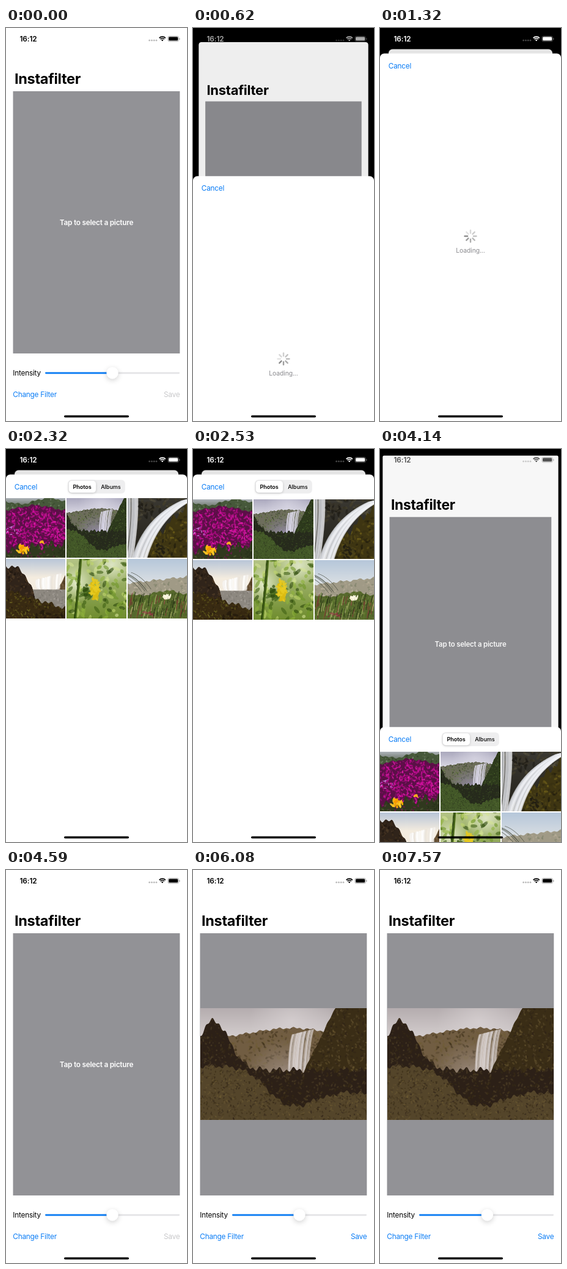
Write an HTML page with a canvas that moves like this. It is 296 px wide and 640 px high and loops after 8000 ms.

```html
<!DOCTYPE html>
<html lang="en">
<head>
<meta charset="utf-8">
<title>Instafilter</title>
<style>
html, body { margin: 0; width: 100%; height: 100%; overflow: hidden; background: #fff; }
canvas { display: block; width: 296px; height: 640px; }
</style>
</head>
<body>
<canvas id="stage"></canvas>
<script>
const W = 296, H = 640, LOOP = 8000;
const PT = 0.6916, BODY = 17 * PT;
const BLUE = '#0a7cf5', GREY = '#929296';
const stage = document.getElementById('stage');
const dpr = window.devicePixelRatio || 1;
stage.width = W * dpr;
stage.height = H * dpr;
const ctx = stage.getContext('2d');

const clamp = v => Math.max(0, Math.min(1, v));
const bump = (x, centre, width) => Math.exp(-(((x - centre) / width) ** 2));
const spring = ms => ms <= 0 ? 0 : 1 - Math.exp(-ms * 0.014) * (1 + ms * 0.014);
// Snaps t to the latest of n evenly spaced moments from a to b.
const snap = (t, a, b, n) => {
  const gap = (b - a) / (n - 1);
  return a + gap * Math.min(n - 1, Math.floor((t - a) / gap + 1e-6));
};

function text(str, x, y, size, colour, { weight = 400, align = 'left', track = -0.2 } = {}) {
  ctx.font = `${weight} ${size}px Inter, "Liberation Sans", sans-serif`;
  ctx.letterSpacing = track + 'px';
  ctx.textAlign = align;
  ctx.fillStyle = colour;
  ctx.fillText(str, x, y);
}

function box(x, y, w, h, r, colour) {
  ctx.fillStyle = colour;
  ctx.beginPath();
  ctx.roundRect(x, y, w, h, r);
  ctx.fill();
}

function raised(x, y, w, h, r, blur, dy) {
  ctx.save();
  ctx.shadowColor = 'rgba(0,0,0,0.18)';
  ctx.shadowBlur = blur * dpr;
  ctx.shadowOffsetY = dy * dpr;
  box(x, y, w, h, r, '#fff');
  ctx.restore();
}

// ---- Pictures ----

function picture(w, h, paint) {
  const c = document.createElement('canvas');
  c.width = w * 2;
  c.height = h * 2;
  const g = c.getContext('2d');
  g.scale(2, 2);
  let seed = 7;
  const rnd = () => (seed = seed * 16807 % 2147483647) / 2147483647;
  const pick = list => list[Math.floor(rnd() * list.length)];

  paint({
    sky(top, bottom, end = h) {
      const f = g.createLinearGradient(0, 0, 0, end);
      f.addColorStop(0, top);
      f.addColorStop(1, bottom);
      g.fillStyle = f;
      g.fillRect(0, 0, w, h);
    },
    // Land below y = line(x), grained with flecks of other colours.
    land(colour, line, flecks = [], size = 2, rough = 2) {
      g.save();
      g.beginPath();
      g.moveTo(0, h);
      for (let x = 0; x <= w; x++) g.lineTo(x, line(x) + rough * Math.sin(x * 0.4) * Math.sin(x * 0.17 + 1));
      g.lineTo(w, h);
      g.fillStyle = colour;
      g.fill();
      g.clip();
      for (let i = 0; flecks.length && i < w * h / size / 12; i++) {
        g.globalAlpha = 0.2 + rnd() * 0.4;
        g.fillStyle = pick(flecks);
        g.beginPath();
        g.ellipse(rnd() * w, rnd() * h, size * (0.5 + rnd()), size * 0.6, rnd() * 3, 0, 7);
        g.fill();
      }
      g.restore();
    },
    patch(colours, n, x, y, rx, ry, size, alpha = 0.8) {
      g.globalAlpha = alpha;
      for (let i = 0; i < n; i++) {
        const a = rnd() * 7, d = Math.sqrt(rnd());
        g.fillStyle = pick(colours);
        g.beginPath();
        g.ellipse(x + rx * d * Math.cos(a), y + ry * d * Math.sin(a), size * (0.5 + rnd()), size * 0.5, rnd() * 3, 0, 7);
        g.fill();
      }
      g.globalAlpha = 1;
    },
    glow(x, y, r, rgb, a) {
      const f = g.createRadialGradient(x, y, 0, x, y, r);
      f.addColorStop(0, `rgba(${rgb},${a})`);
      f.addColorStop(1, `rgba(${rgb},0)`);
      g.fillStyle = f;
      g.fillRect(x - r, y - r, r * 2, r * 2);
    },
    // Bundle of curved strands, each scattered by up to `spread`.
    strands(colours, n, [x0, y0], [cx, cy], [x1, y1], spread, width, alpha = 0.4) {
      g.globalAlpha = alpha;
      g.lineWidth = width;
      for (let i = 0; i < n; i++) {
        const d = (rnd() - 0.5) * 2 * spread;
        g.strokeStyle = pick(colours);
        g.beginPath();
        g.moveTo(x0 + d, y0 - d * 0.25);
        g.quadraticCurveTo(cx + d, cy - d * 0.25, x1 + d * 0.9, y1 + rnd() * 6);
        g.stroke();
      }
      g.globalAlpha = 1;
    }
  });
  return c;
}

const valley = tone => picture(273, 182, p => {
  p.sky(tone.sky, tone.haze, 50);
  p.glow(150, 22, 70, tone.light, 0.6);
  p.land(tone.hill, x => 50 - 18 * bump(x, 150, 90), [tone.moss, tone.dark], 2.5);
  p.glow(140, 122, 74, tone.mist, 0.95);
  p.strands([tone.fall, tone.haze], 60, [169, 38], [162, 56], [160, 130], 18, 2, 0.35);
  p.glow(140, 130, 40, tone.mist, 0.8);
  p.land(tone.dark, x => 158 - 2 * (x - 142), [tone.moss, tone.ground, tone.shade], 2.2);
  p.land(tone.shade, x => 100 - 80 * bump(x, 22, 36), [tone.ground, tone.dark], 2.2, 5);
  p.land(tone.ground, x => 94 + 64 * bump(x, 148, 52) + x / 6 * clamp((x - 150) / 60), [tone.moss, tone.dark, tone.shade], 1.8, 4);
});

const sepia = valley({
  sky: '#b5adaf', haze: '#d6d0d0', light: '222,216,217', hill: '#715d42', mist: '164,148,138',
  fall: '#e2dbd8', dark: '#3a2d16', shade: '#2c2017', moss: '#6e5c34', ground: '#54452a'
});
const violet = valley({
  sky: '#aaa8bd', haze: '#dddbe6', light: '224,222,234', hill: '#6d6d5c', mist: '158,148,184',
  fall: '#e0dcf2', dark: '#2d3a1c', shade: '#262a1c', moss: '#5f7838', ground: '#435828'
});

const square = paint => picture(98, 98, paint);
const pinks = ['#d010a0', '#a80880', '#e81cb0', '#6a0c50', '#c00890'];

const blooms = square(p => {
  p.sky('#aeb4ba', '#5c6656', 16);
  p.land('#46583a', x => 5 + 5 * Math.sin(x / 15), ['#28351e', '#8a9684', '#5c7248'], 2);
  p.land('#5a1046', x => 21 - 9 * bump(x, 48, 34), pinks, 1.8);
  p.patch(pinks, 420, 48, 50, 56, 36, 2.4, 0.7);
  p.land('#30381e', x => 84 - x / 10, ['#1e2814', '#56663a', '#84105e'], 2, 8);
  p.patch(['#b45ad0', '#cb83dc'], 14, 10, 52, 12, 10, 1.6);
  p.patch(['#ffb400', '#f59a00', '#ffc928'], 22, 27, 84, 10, 7, 3.6, 0.9);
  p.patch(['#ffb81c'], 6, 59, 72, 3, 2, 2, 0.9);
});

const cascade = square(p => {
  p.sky('#3a3832', '#24221a');
  p.patch(['#1c1a14', '#57523e', '#45402a'], 90, 48, 14, 50, 26, 4, 0.5);
  p.land('#3e3512', x => 110 - x, ['#7c6c1c', '#1c180c', '#5c4e18', '#2a2410'], 3, 8);
  p.strands(['#f2f3f6', '#a9abb0'], 34, [8, -4], [10, 40], [0, 98], 9, 2.4, 0.4);
  p.strands(['#fbfbfd', '#c3c5ca', '#eceef2'], 70, [102, 2], [36, 32], [18, 104], 13, 2.2, 0.4);
  p.patch(['#1e1b12', '#4a411a'], 40, 54, 84, 11, 16, 3.5, 0.7);
  p.patch(['#1e1b14', '#39352a'], 24, 32, 16, 12, 14, 4, 0.7);
});

const cliff = square(p => {
  p.sky('#b9c6d8', '#f4ecdf', 30);
  p.land('#665034', x => 54 - 30 * bump(x, 104, 16), ['#4a3822', '#83694a'], 2);
  p.strands(['#fff', '#eae4dc'], 50, [70, 29], [68, 38], [70, 48], 21, 3, 0.5);
  p.land('#8d8880', () => 50, ['#b2aca5', '#6f6b65'], 2, 0);
  p.land('#30241a', x => 12 + 60 * (x / 50) ** 3, ['#5c452c', '#19120c', '#4a3620'], 2.2, 4);
  p.land('#382a12', x => 50 + x * 0.32, ['#6b6a1c', '#1c150a', '#5a4416', '#83802a'], 1.8, 4);
  p.patch(['#20180c', '#332610'], 60, 84, 96, 36, 13, 4, 0.6);
});

const leaves = square(p => {
  p.sky('#b4c486', '#6f8c2e');
  p.glow(16, 40, 32, '236,242,212', 0.9);
  p.glow(74, 10, 34, '232,238,212', 0.8);
  p.patch(['#3f6014', '#8fb23c', '#2c480c', '#bfd66c', '#6f9628', '#d4e294'], 170, 49, 49, 66, 66, 5.5, 0.6);
  p.strands(['#2c460e', '#54761e'], 10, [24, -4], [20, 50], [14, 98], 3, 1.4, 0.7);
  p.patch(['#2c480e', '#41641a'], 16, 33, 56, 7, 13, 5, 0.7);
  p.patch(['#dcbc10', '#e8cc22'], 60, 46, 50, 6, 17, 4, 0.8);
});

const dunes = square(p => {
  p.sky('#b6c7da', '#dfe2e4', 45);
  p.land('#a09a86', x => 40 - x / 9, ['#7c8068', '#c6bca6', '#b4aa94'], 2.2);
  p.land('#56682c', x => 56 + 4 * Math.sin(x / 14), ['#34451c', '#8c9e54', '#74833e'], 1.8);
  for (let i = 0; i < 90; i++) {
    const x = i * 37 % 98, y = 68 + i * 23 % 34;
    p.strands(['#5d7a2c', '#2c3a18', '#7c3e34', '#a3a868'], 1, [x, y], [x, y - 5], [x + 3, y - 17], 3, 1.4, 0.8);
  }
  p.strands(['#41463a'], 5, [-2, 24], [16, 30], [32, 48], 14, 0.7, 0.8);
  p.patch(['#8c1f3c', '#a83450'], 14, 32, 90, 11, 5, 1.6);
  p.patch(['#f6f0d4', '#fffbe6'], 20, 65, 62, 7, 3, 2.4, 0.9);
});

const thumbs = [blooms, violet, cascade, cliff, leaves, dunes];

// ---- Interface ----

function statusBar(p) {
  const v = Math.round(255 * p), colour = `rgb(${v},${v},${v})`;
  text('16:12', 22.5, 22, BODY, colour, { weight: 600, track: -0.1 });
  ctx.fillStyle = ctx.strokeStyle = colour;
  ctx.globalAlpha = 0.27;
  for (let i = 0; i < 4; i++) {
    ctx.beginPath();
    ctx.arc(234.6 + i * 3.8, 20.2, 1.35, 0, 7);
    ctx.fill();
  }
  ctx.globalAlpha = 1;
  ctx.lineWidth = 1.7;
  const a = Math.PI * 1.25, b = Math.PI * 1.75;
  for (const r of [7.2, 4.5]) {
    ctx.beginPath();
    ctx.arc(255.7, 21.4, r, a, b);
    ctx.stroke();
  }
  ctx.beginPath();
  ctx.moveTo(255.7, 21.6);
  ctx.arc(255.7, 21.4, 2.5, a, b);
  ctx.fill();
  ctx.globalAlpha = 0.4;
  ctx.lineWidth = 0.8;
  ctx.beginPath();
  ctx.roundRect(264.8, 13.4, 17.6, 8.4, 2.5);
  ctx.stroke();
  box(283.3, 16.2, 1.1, 3, 0.6, colour);
  ctx.globalAlpha = 1;
  box(266, 14.6, 15.2, 6, 1.5, colour);
}

function home(loaded, knob) {
  text('Instafilter', 13.9, 91.3, 34 * PT, '#000', { weight: 700, track: -0.3 });
  box(11.5, 103, 272.8, 427, 0, GREY);
  if (loaded) ctx.drawImage(sepia, 11.5, 225.4, 272.8, 182);
  else text('Tap to select a picture', 148, 320.8, BODY, '#fff', { weight: 600, align: 'center' });

  text('Intensity', 11.3, 565.6, BODY, '#000');
  box(64, 560.4, 220, 2.8, 1.4, '#e4e4e6');
  box(64, 560.4, knob - 64, 2.8, 1.4, BLUE);
  raised(knob - 9.7, 552, 19.4, 19.4, 9.7, 8, 2.6);

  text('Change Filter', 11.3, 601.2, BODY, BLUE);
  text('Save', 284.4, 601.2, BODY, loaded ? BLUE : '#c8c8ca', { align: 'right' });
}

function spinner(x, y, head) {
  ctx.save();
  ctx.translate(x, y);
  ctx.lineCap = 'round';
  ctx.lineWidth = 2.4;
  for (let age = 0; age < 8; age++) {
    const v = Math.round(140 + 86 * (age / 7) ** 0.8);
    const a = (head - age) * Math.PI / 4, c = Math.cos(a), s = Math.sin(a);
    ctx.strokeStyle = `rgb(${v},${v},${v})`;
    ctx.beginPath();
    ctx.moveTo(c * 4.9, s * 4.9);
    ctx.lineTo(c * 9.5, s * 9.5);
    ctx.stroke();
  }
  ctx.restore();
}

function picker() {
  box(101.2, 50.2, 93.6, 22.4, 6, '#eeeeef');
  raised(102.7, 51.7, 44.3, 19.4, 5, 4, 1.2);
  text('Photos', 124.6, 64.7, 13 * PT, '#000', { weight: 600, align: 'center', track: 0 });
  text('Albums', 171.4, 64.7, 13 * PT, '#000', { weight: 500, align: 'center', track: 0 });
}

function grid(top) {
  const size = 97.4, step = 99.3;
  thumbs.forEach((img, i) => {
    const x = i % 3 * step, y = top + Math.floor(i / 3) * step;
    const side = img.height;
    ctx.drawImage(img, (img.width - side) / 2, 0, side, side, x, y, size, size);
  });
}

// Drawn in its resting place; the caller shifts it.
function sheet(t) {
  box(0, 60 * PT, W, H, [7, 7, 0, 0], '#fff');
  text('Cancel', 13.8, 65.6, BODY, BLUE);
  if (t < 1880) {
    const turn = t < 1320 ? -1 : Math.round((snap(t, 1320, 1730, 5) - 1320) / 102.5);
    spinner(148, 339, 4 + turn);
    text('Loading...', 148, 366, 15 * PT, '#8a8a8e', { align: 'center', track: -0.1 });
    return;
  }
  const s = snap(t, 1880, 2530, 7);
  ctx.globalAlpha = clamp((s - 1780) / 300);
  picker();
  grid(81.6 - (s < 2530 ? 16 * Math.exp((1880 - s) / 208) : 0));
  ctx.globalAlpha = 1;
}

function sheetAt(t) {
  if (t < 500 || t >= 4590) return 0;
  if (t < 1180) return spring(snap(t, 500, 1180, 7) - 450);
  if (t < 4015) return 1;
  return 1 - spring(snap(t, 3900, 4590, 7) - 3960);
}

function draw(t) {
  const p = sheetAt(t);
  ctx.setTransform(dpr, 0, 0, dpr, 0, 0);
  box(0, 0, W, H, 0, p ? '#000' : '#fff');

  ctx.save();
  const scale = 1 - 0.095 * p;
  ctx.translate(W / 2 * (1 - scale), 50 * PT * p);
  ctx.scale(scale, scale);
  box(0, 0, W, H, 7 * p, '#fff');
  home(t >= 6080, t >= 7570 ? 175.4 : 174);
  if (p) box(0, 0, W, H, 7 * p, `rgba(0,0,0,${0.1 * p})`);
  ctx.restore();

  if (p) {
    ctx.save();
    ctx.translate(0, (H - 60 * PT) * (1 - p));
    sheet(t);
    ctx.restore();
  }
  statusBar(p);
  box(95, 630.7, 106, 5 * PT, 1.7, '#000');
}

function frame() {
  draw(performance.now() % LOOP);
  requestAnimationFrame(frame);
}
frame();
</script>
</body>
</html>
```
